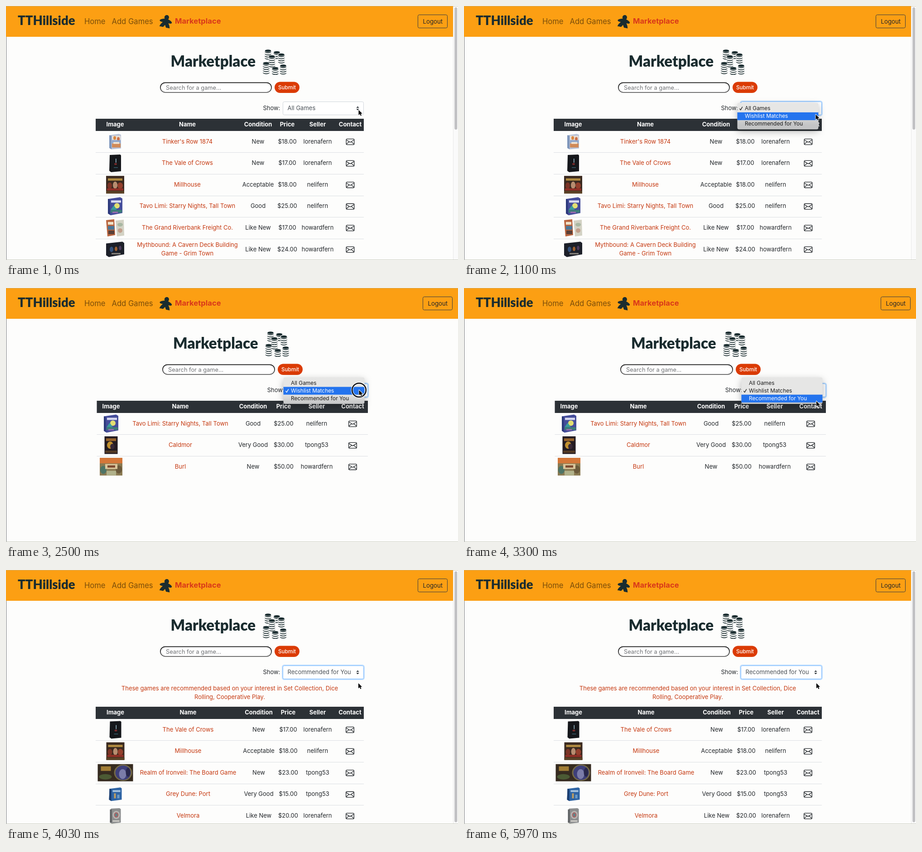
Recreate the animation shown at these times as an HTML page with a canvas. Size 998 by 561 pixels, loop 6.01 s.

```html
<!DOCTYPE html>
<html lang="en">
<head>
<meta charset="utf-8">
<title>Marketplace</title>
<style>
  html, body { margin: 0; width: 100%; height: 100%; overflow: hidden; background: #fdfdfc; }
  canvas { display: block; width: 998px; height: 561px; }
</style>
</head>
<body>
<canvas id="stage" width="998" height="561"></canvas>
<script>
const ctx = document.getElementById('stage').getContext('2d');
const W = 998, H = 561, LOOP = 6010;
const INK = '#212529', DEEP = '#1a2c2f', LINK = '#c5370e', ORANGE = '#fc9f13', PAPER = '#fdfdfc';
const BODY = 'Inter, "Open Sans", sans-serif', DISPLAY = 'Lato, sans-serif';

function rect(x, y, w, h, color) {
  ctx.fillStyle = color;
  ctx.fillRect(x, y, w, h);
}

function roundBox(x, y, w, h, r, fill, stroke, width = 1) {
  ctx.beginPath();
  ctx.roundRect(x, y, w, h, r);
  if (fill) { ctx.fillStyle = fill; ctx.fill(); }
  if (stroke) { ctx.strokeStyle = stroke; ctx.lineWidth = width; ctx.stroke(); }
}

function oval(x, y, rx, ry, color) {
  ctx.beginPath();
  ctx.ellipse(x, y, rx, ry, 0, 0, Math.PI * 2);
  ctx.fillStyle = color;
  ctx.fill();
}

function shape(points, color) {
  ctx.beginPath();
  points.forEach(([x, y], i) => i ? ctx.lineTo(x, y) : ctx.moveTo(x, y));
  ctx.closePath();
  ctx.fillStyle = color;
  ctx.fill();
}

function text(str, x, y, { size = 13, weight = 400, color = INK, align = 'left', family = BODY } = {}) {
  ctx.font = `${weight} ${size}px ${family}`;
  ctx.textAlign = align;
  ctx.fillStyle = color;
  ctx.fillText(str, x, y);
}

const centered = (str, x, y, style) => text(str, x, y, { align: 'center', ...style });

// Box covers, drawn around their centre
const covers = {
  fair() {
    shape([[-13, -14], [8, -17], [13, -15], [13, 15], [-8, 17], [-13, 14]], '#b7c2d8');
    shape([[-13, -14], [-8, -13], [-8, 17], [-13, 14]], '#7f96bb');
    rect(-7, -13, 19, 9, '#e9dfd6');
    oval(-1, -8, 3, 4, '#d9873f');
    oval(7, -6, 3, 4, '#c9704b');
    rect(-7, -3, 19, 6, '#8ea6cc');
    rect(-7, 4, 19, 9, '#d08a58');
    rect(-4, 1, 13, 4, '#f2e5d3');
  },
  vale() {
    shape([[-12, -18], [11, -19], [13, -17], [13, 18], [-9, 20], [-13, 17]], '#15171b');
    rect(1, -10, 1.5, 9, '#9cc0cf');
    oval(1, 2, 3, 2, '#7c2c2c');
    rect(-3, 9, 9, 1.5, '#38606f');
  },
  mill() {
    rect(-20, -19.5, 40, 39, '#3b2a20');
    rect(-16, -14, 32, 5, '#b08a40');
    oval(-12, 2, 5, 7, '#7c3426');
    oval(0, 1, 5, 8, '#b78d70');
    oval(11, 2, 6, 7, '#94402d');
    rect(-18, 8, 36, 5, '#8f2f26');
    rect(-20, 14, 40, 5.5, '#5a4226');
  },
  night() {
    shape([[-16, -16], [11, -20], [16, -17], [16, 15], [-10, 20], [-16, 16]], '#454d9b');
    shape([[-16, -16], [-12, -15], [-11, 19], [-16, 16]], '#2d3a7c');
    rect(-9, -13, 22, 5, '#d7d9ef');
    oval(4, -1, 6, 6, '#e3df72');
    shape([[-10, 8], [-3, -2], [4, 8]], '#3a9c9c');
    rect(-10, 8, 25, 6, '#3d7d79');
    rect(-6, 12, 12, 3, '#9c6bb0');
  },
  freight() {
    shape([[-20, -17], [-2, -19], [0, 16], [-17, 19]], '#b9653f');
    rect(-16, -13, 12, 6, '#efe2c9');
    rect(-16, -4, 14, 8, '#4b7798');
    rect(-15, 6, 13, 8, '#5a4038');
    shape([[1, -16], [19, -18], [20, 17], [4, 19]], '#d3d2c4');
    oval(11, -7, 6, 4, '#a9b8a3');
    oval(11, 6, 5, 5, '#c3a08d');
  },
  cavern() {
    shape([[-20, -13], [16, -17], [20, -14], [20, 11], [-14, 17], [-20, 13]], '#1d2029');
    oval(-8, 0, 4, 6, '#34517b');
    oval(2, -1, 3, 5, '#a0612f');
    oval(11, -3, 3, 5, '#4c3a5d');
    rect(-8, 8, 20, 3, '#8b867f');
  },
  keep() {
    rect(-14.5, -19.5, 29, 39, '#231b21');
    rect(-11, -15, 22, 6, '#95622c');
    oval(-2, 0, 7, 8, '#c1902f');
    oval(3, 3, 5, 6, '#372836');
    rect(-13, 12, 26, 5, '#533a24');
  },
  forest() {
    rect(-25, -19.5, 50, 39, '#8a7a52');
    rect(-25, -19.5, 50, 12, '#d57739');
    oval(-17, 7, 7, 9, '#4e7465');
    oval(17, 6, 7, 9, '#6b5a3c');
    rect(-13, -6, 27, 11, '#dbc59b');
    rect(-8, -3, 17, 5, '#7c4a30');
    rect(-10, 9, 21, 10, '#b1b28b');
  },
  realm() {
    rect(-39, -19, 78, 38, '#362b20');
    rect(-32, -14, 22, 10, '#a17d35');
    oval(-22, 9, 14, 6, '#4b5a34');
    oval(17, 0, 20, 18, '#756b46');
    oval(17, 0, 17, 16, '#3e3f79');
    oval(16, 3, 8, 11, '#7b7ca9');
    oval(28, -1, 5, 10, '#29274c');
  },
  dune() {
    shape([[-13, -12], [11, -15], [14, -13], [14, 12], [-9, 15], [-14, 12]], '#2e64a4');
    shape([[-13, -12], [-9, -11], [-9, 15], [-14, 12]], '#1b3d70');
    rect(-6, -9, 17, 4, '#a6c3df');
    rect(-3, -2, 4, 11, '#bd9d62');
    rect(4, 1, 5, 8, '#6d9bc6');
  },
  glass() {
    shape([[-10, -16], [9, -17], [12, -15], [12, 15], [-8, 17], [-12, 15]], '#8c8e8f');
    rect(-12, -14, 4, 29, '#5d6062');
    oval(2, -2, 8, 9, '#b8b6b2');
    oval(2, -2, 5, 6, '#a0686a');
    oval(2, -2, 2, 3, '#528c91');
    rect(-6, 10, 15, 3, '#d1cfca');
  }
};

const row = (cover, name, condition, price, seller) => ({ cover, name, condition, price, seller });
const valeRow = row('vale', ['The Vale of Crows'], 'New', '$17.00', 'lorenafern');
const millRow = row('mill', ['Millhouse'], 'Acceptable', '$18.00', 'nelifern');
const nightRow = row('night', ['Tavo Limi: Starry Nights, Tall Town'], 'Good', '$25.00', 'nelifern');

const pages = {
  all: {
    label: 'All Games', left: 198, right: 790, top: 249, thumb: 270, dx: 0,
    cols: [241, 400.5, 556.5, 621, 688, 760],
    rows: [
      row('fair', ["Tinker's Row 1874"], 'New', '$18.00', 'lorenafern'),
      valeRow, millRow, nightRow,
      row('freight', ['The Grand Riverbank Freight Co.'], 'Like New', '$17.00', 'howardfern'),
      row('cavern', ['Mythbound: A Cavern Deck Building', 'Game - Grim Town'], 'Like New', '$24.00', 'howardfern')
    ]
  },
  wish: {
    label: 'Wishlist Matches', left: 200.5, right: 799, top: 249, thumb: 0, dx: 5.5,
    cols: [232, 385, 545.5, 613, 686, 765.5],
    rows: [
      nightRow,
      row('keep', ['Caldmor'], 'Very Good', '$30.00', 'tpong53'),
      row('forest', ['Burl'], 'New', '$50.00', 'howardfern')
    ]
  },
  rec: {
    label: 'Recommended for You', left: 198, right: 790, top: 302, thumb: 554, dx: 0,
    cols: [241.5, 402, 558, 623, 688, 759.5],
    note: ['These games are recommended based on your interest in Set Collection, Dice', 'Rolling, Cooperative Play.'],
    rows: [
      valeRow, millRow,
      row('realm', ['Realm of Ironveil: The Board Game'], 'New', '$23.00', 'tpong53'),
      row('dune', ['Grey Dune: Port'], 'Very Good', '$15.00', 'tpong53'),
      row('glass', ['Velmora'], 'Like New', '$20.00', 'lorenafern')
    ]
  }
};

function drawMeeple(x, y) {
  ctx.save();
  ctx.translate(x, y);
  ctx.rotate(0.22);
  ctx.scale(1.06, 1.06);
  oval(0, -8, 4.8, 5, DEEP);
  ctx.beginPath();
  ctx.moveTo(-3, -5);
  ctx.quadraticCurveTo(-13, -2, -13, 1);
  ctx.quadraticCurveTo(-12, 4, -6, 3);
  ctx.quadraticCurveTo(-10, 8, -11, 13);
  ctx.lineTo(-3, 13);
  ctx.lineTo(0, 8);
  ctx.lineTo(3, 13);
  ctx.lineTo(11, 13);
  ctx.quadraticCurveTo(10, 8, 6, 3);
  ctx.quadraticCurveTo(12, 4, 13, 1);
  ctx.quadraticCurveTo(13, -2, 3, -5);
  ctx.fill();
  ctx.restore();
}

function drawStack(x, y, n) {
  const gap = 4.7;
  for (let i = n - 1; i >= 0; i--) {
    const cy = y + i * gap;
    oval(x, cy + 2, 7.2, 3.2, DEEP);
    oval(x, cy, 8.2, 3.5, PAPER);
  }
  oval(x, y, 6.8, 2.7, DEEP);
}

function drawCoins(dx) {
  drawStack(578.5 + dx, 99, 4);
  drawStack(598 + dx, 102.5, 3);
  drawStack(608 + dx, 107.5, 4);
  drawStack(587 + dx, 111.5, 5);
  drawStack(574.5 + dx, 126.5, 5);
  drawStack(594.5 + dx, 137.5, 3);
  drawStack(612 + dx, 132, 4);
}

function drawEnvelope(x, y) {
  roundBox(x - 8.8, y - 6.3, 17.6, 12.6, 2, null, INK, 1.3);
  ctx.beginPath();
  ctx.moveTo(x - 8.5, y - 4.2);
  ctx.lineTo(x, y + 1);
  ctx.lineTo(x + 8.5, y - 4.2);
  ctx.moveTo(x - 8.3, y + 5);
  ctx.lineTo(x - 2.2, y - 0.2);
  ctx.moveTo(x + 8.3, y + 5);
  ctx.lineTo(x + 2.2, y - 0.2);
  ctx.stroke();
}

function drawNav(page) {
  const right = page.thumb ? 987 : W;
  rect(0, 0, right, 68, ORANGE);
  text('TTHillside', 26, 41.5, { size: 27.5, weight: 900, color: DEEP, family: DISPLAY });
  const link = { size: 16.6, color: 'rgba(0,0,0,.52)' };
  text('Home', 173, 40, link);
  text('Add Games', 233.5, 40, link);
  drawMeeple(353, 33.5);
  text('Marketplace', 373, 39, { size: 16.6, weight: 700, color: '#d9381a' });
  roundBox(right - 77.5, 19.5, 65, 29, 3, null, '#343a40');
  centered('Logout', right - 44.7, 38.5, { size: 13.3 });
}

function drawScrollbar(page) {
  if (!page.thumb) return;
  rect(987, 0, 11, H, '#fafafa');
  rect(987, 0, 1, H, '#e8e8e8');
  roundBox(990.3, 3, 6, page.thumb, 3, '#c1c1c3');
}

function drawSearch(page) {
  const wide = page === pages.wish;
  const x = wide ? 345 : 340, w = wide ? 249 : 247;
  const edge = ctx.createLinearGradient(0, 168, 0, 192);
  edge.addColorStop(0.1, '#161616');
  edge.addColorStop(0.9, '#5f5f5f');
  roundBox(x + 0.9, 169.3, w - 1.8, 21.6, 10.8, '#fff', edge, 1.8);
  text('Search for a game...', x + 13, 184.5, { size: 12.8, color: '#6f7174' });
  const bx = wide ? 600 : 593;
  roundBox(bx, 167.5, 55, 24.5, 12.25, '#db3b05');
  centered('Submit', bx + 27.5, 184, { size: 11.7, weight: 500, color: '#fff' });
}

function drawSelect(page, focused) {
  const x = page === pages.wish ? 620.8 : 611.5;
  text('Show:', x - 44, 230, { size: 12.9 });
  if (focused) roundBox(x - 1.2, 210.3, 180.4, 31.4, 4, null, '#bfdeff', 2.5);
  roundBox(x, 211.5, 178, 29, 3, '#fff', focused ? '#80bdff' : '#ced4da');
  text(page.label, x + 10, 230, { color: '#495057' });
  const ax = x + 165;
  shape([[ax - 3.2, 225], [ax + 3.2, 225], [ax, 221.6]], '#343a40');
  shape([[ax - 3.2, 227], [ax + 3.2, 227], [ax, 230.4]], '#343a40');
}

function drawTable(page) {
  const { left, right, top, cols } = page;
  (page.note || []).forEach((line, i) => centered(line, 494, 266 + i * 19, { color: LINK }));
  rect(left, top, right - left, 27, '#2c3136');
  ['Image', 'Name', 'Condition', 'Price', 'Seller', 'Contact'].forEach((name, i) =>
    centered(name, cols[i], top + 17.3, { weight: 700, color: '#fff' }));
  page.rows.forEach((r, i) => {
    const mid = top + 50.5 + i * 47.6, base = mid + 4;
    if (i) rect(left, Math.round(top + 26.8 + i * 47.6), right - left, 1, '#dbdfe3');
    ctx.save();
    ctx.translate(cols[0], mid);
    covers[r.cover]();
    ctx.restore();
    r.name.forEach((line, k) =>
      centered(line, cols[1], base + (k - (r.name.length - 1) / 2) * 19, { color: LINK }));
    centered(r.condition, cols[2], base);
    centered(r.price, cols[3], base);
    centered(r.seller, cols[4], base);
    drawEnvelope(cols[5], mid + 0.5);
  });
}

function drawPage(page, focused) {
  rect(0, 0, W, H, PAPER);
  drawNav(page);
  text('Marketplace', 363.5 + page.dx, 133.5, { size: 33.1, weight: 900, color: DEEP, family: DISPLAY });
  drawCoins(page.dx);
  drawSearch(page);
  drawSelect(page, focused);
  drawTable(page);
  drawScrollbar(page);
  rect(0, 68, 1, H - 68, '#75787a');
  rect(0, H - 1, W, 1, '#c9cbbf');
  rect(0, 0, W, 1, 'rgba(190,180,140,.6)');
}

// The menu is frosted: the dark table head shows through, blurred
function frost(y, h, headTop) {
  const stop = d => Math.min(1, (headTop + d - y) / h);
  const fill = ctx.createLinearGradient(0, y, 0, y + h);
  fill.addColorStop(stop(-16), '#e6e6e5');
  fill.addColorStop(stop(14), '#c3c4c5');
  return fill;
}

function drawMenu(page, pointerY, alpha) {
  const first = page === pages.all;
  const x = first ? 603.5 : 612.5, y = first ? 214 : 197.5, pitch = 17.2;
  const hover = Math.max(0, Math.min(2, Math.floor((pointerY - y - 3.5) / pitch)));
  ctx.save();
  ctx.globalAlpha = alpha;
  ctx.shadowColor = 'rgba(0,0,0,.28)';
  ctx.shadowBlur = 16;
  ctx.shadowOffsetY = 5;
  roundBox(x, y, 179, 58.5, 4, frost(y, 58.5, page.top));
  ctx.shadowColor = 'transparent';
  Object.values(pages).forEach((item, i) => {
    const top = y + 3.7 + i * pitch, on = i === hover;
    if (on) rect(x, top, 179, pitch, '#2474ee');
    const color = on ? '#fff' : '#1b1b1b';
    text(item.label, x + 16.5, top + 12.3, { size: 11.9, color });
    if (item === page) {
      ctx.beginPath();
      ctx.moveTo(x + 5, top + 9);
      ctx.lineTo(x + 7.2, top + 12);
      ctx.lineTo(x + 11.3, top + 5);
      ctx.strokeStyle = color;
      ctx.lineWidth = 1.3;
      ctx.stroke();
    }
  });
  ctx.restore();
}

function drawRing(x, y) {
  ctx.beginPath();
  ctx.arc(x, y, 15.3, 0, Math.PI * 2);
  ctx.strokeStyle = 'rgba(255,255,255,.8)';
  ctx.lineWidth = 5;
  ctx.stroke();
  ctx.strokeStyle = '#0c0d12';
  ctx.lineWidth = 2.6;
  ctx.stroke();
}

function drawPointer(x, y) {
  const arrow = [[0, 0], [0, 11.5], [2.7, 9], [4.6, 13], [6.5, 12.1], [4.7, 8.2], [8.2, 8.2]]
    .map(([px, py]) => [x + px, y + py]);
  shape(arrow, '#000');
  ctx.strokeStyle = '#fff';
  ctx.lineWidth = 1.8;
  ctx.lineJoin = 'round';
  ctx.stroke();
  ctx.fill();
}

const route = [
  [0, 778.5, 229.5], [600, 778.5, 229.5], [950, 776.5, 239.5], [1900, 776.5, 240],
  [2300, 779.5, 225.5], [2750, 779.5, 225.5], [3200, 778, 250], [LOOP, 778, 250]
];

function pointerAt(t) {
  const i = route.findIndex(([time]) => time > t);
  const [t0, x0, y0] = route[i - 1], [t1, x1, y1] = route[i];
  const p = (t - t0) / (t1 - t0), e = p * p * (3 - 2 * p);
  return [x0 + (x1 - x0) * e, y0 + (y1 - y0) * e];
}

// Opaque while open, then a short fade
function menuAlpha(t, open, close) {
  if (t < open) return 0;
  return Math.max(0, Math.min(1, 1 - (t - close) / 120));
}

const clicks = [440, 1320, 2400, 3470];

function draw(t) {
  const page = t < 1550 ? pages.all : t < 3740 ? pages.wish : pages.rec;
  const [x, y] = pointerAt(t);
  drawPage(page, t >= 480);
  const alpha = t < 2000 ? menuAlpha(t, 480, 1410) : menuAlpha(t, 2450, 3555);
  if (alpha > 0) drawMenu(page, y, alpha);
  if (clicks.some(c => t >= c && t < c + 160)) drawRing(x, y);
  drawPointer(x, y);
}

function tick() {
  draw(performance.now() % LOOP);
  requestAnimationFrame(tick);
}
tick();
</script>
</body>
</html>
```
